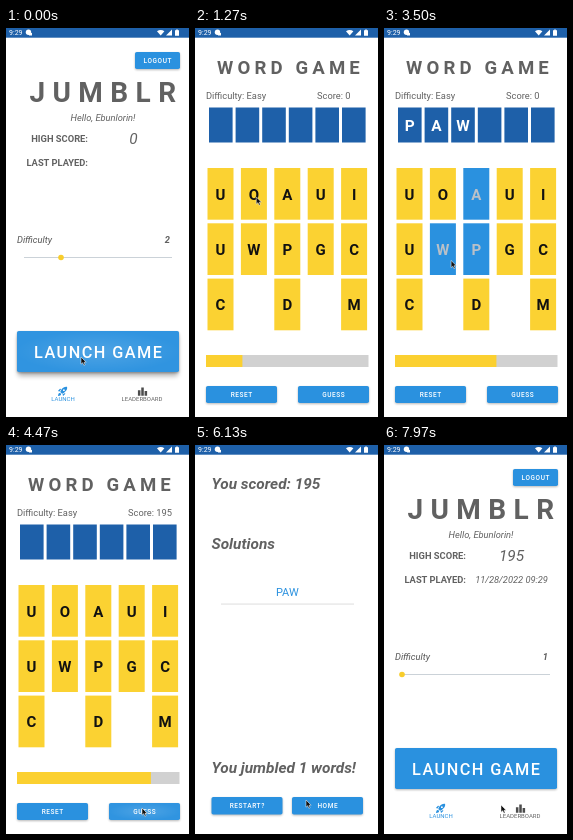
These frames come from a looping animation (183x389 px, 8 s). An HTML page:

```html
<!DOCTYPE html>
<html lang="en">
<head>
<meta charset="utf-8">
<title>Word game</title>
<style>
  html, body { margin: 0; width: 100%; height: 100%; overflow: hidden; background: #fff; }
  svg { display: block; width: 100vw; height: 100vh; }
  text { font-family: Roboto, sans-serif; fill: #616161; white-space: pre; }
</style>
</head>
<body>
<svg id="stage" viewBox="0 0 183 389"></svg>
<script>
const LOOP = 8000;
const BLUE = '#2a91df', NAVY = '#1e60a9', YELLOW = '#fbd232', GREY = '#616161';
const LETTERS = ['UOAUI', 'UWPGC', 'C D M'];

// ---------- drawing helpers ----------
const rect = (x, y, w, h, fill, more = '') =>
  `<rect x="${x}" y="${y}" width="${w}" height="${h}" fill="${fill}" ${more}/>`;

function text(x, y, size, str, o = {}) {
  const { weight = 400, italic, fill = GREY, anchor = 'start', gap = 0, id = '' } = o;
  const dx = anchor === 'middle' ? gap / 2 : 0;
  return `<text ${id && `id="${id}"`} x="${x + dx}" y="${y}" text-anchor="${anchor}" style="font-size:${size}px;` +
    `font-weight:${weight};font-style:${italic ? 'italic' : 'normal'};letter-spacing:${gap}px;fill:${fill}">${str}</text>`;
}

function button(id, x, y, w, h, label, size = 6.5, baseline = y + h / 2 + 2.3) {
  return rect(x, y + 1, w, h, '#000', `rx="2" opacity=".28" filter="url(#soft)"`) +
    rect(x, y, w, h, BLUE, 'rx="1.8"') +
    rect(x, y, w, h, 'url(#glow)', `id="${id}Glow" rx="1.8" opacity="0"`) +
    text(x + w / 2, baseline, size, label,
      { weight: 500, fill: '#fff', anchor: 'middle', gap: size * .089 });
}

const screen = (id, body) =>
  `<g id="${id}">${rect(0, 0, 183, 389, '#fff')}${body}</g>`;

// ---------- screens ----------
const bold = { weight: 700 };
const boldItalic = { weight: 700, italic: true };

const home = screen('home',
  button('logout', 129, 24, 45, 17, 'LOGOUT') +
  text(23.5, 74, 28, 'JUMBLR', { ...bold, gap: 7.4 }) +
  text(97, 93, 9.3, 'Hello, Ebunlorin!', { italic: true, anchor: 'middle' }) +
  text(82, 114, 9.35, 'HIGH SCORE:', { ...bold, anchor: 'end' }) +
  text(82, 137.5, 9.35, 'LAST PLAYED:', { ...bold, anchor: 'end' }) +
  text(127.5, 116.3, 15.4, '0', { italic: true, anchor: 'middle', id: 'best' }) +
  text(127.5, 137.5, 9.3, '', { italic: true, anchor: 'middle', id: 'played' }) +
  text(11, 215, 9.3, 'Difficulty', { italic: true, fill: '#555' }) +
  text(164, 215, 9.3, '2', { ...boldItalic, anchor: 'end', id: 'level' }) +
  rect(18, 229, 148, 1, '#cbd2d8') +
  `<circle id="thumb" cy="229.5" r="2.8" fill="#f8cd2c"/>` +
  rect(12, 307, 160, 41, '#000', 'id="lift" rx="2" opacity="0" filter="url(#wide)"') +
  button('launch', 11, 303, 162, 41, 'LAUNCH GAME', 16.3, 330) +
  `<g transform="translate(51 358) scale(.46)" fill="${BLUE}">
    <path d="M22 2C17 1 13 4 10 7Q8 10 7 13L11 17Q14 16 17 13C20 10 23 7 22 2ZM15 7a2 2 0 1 1 0 4a2 2 0 0 1 0-4Z" fill-rule="evenodd"/>
    <path d="M9 6.300L6.500 6.200L2 10.700L5.600 12.200ZM17.700 15L17.800 17.500L13.300 22L11.800 18.400ZM6 15a3 3 0 0 1 2 5Q6 21.500 2 22Q2.500 18 4 16Z"/>
  </g>` +
  `<path transform="translate(131 358) scale(.46)" fill="#4c4c4c" d="M2 9h5.500v12H2ZM9.250 3h5.500v18h-5.500ZM16.500 11H22v10h-5.500Z"/>` +
  text(57, 373, 6, 'LAUNCH', { fill: BLUE, anchor: 'middle' }) +
  text(136, 373, 6, 'LEADERBOARD', { anchor: 'middle' }));

let slots = '', tiles = '';
for (let i = 0; i < 6; i++) {
  const x = 14 + 26.6 * i;
  slots += rect(x, 79.5, 23.6, 35, NAVY) +
    text(x + 11.8, 103, 15.4, '', { ...bold, fill: '#fff', anchor: 'middle', id: 'slot' + i });
}
LETTERS.forEach((row, r) => [...row].forEach((ch, c) => {
  if (ch === ' ') return;
  const x = 12.5 + 33.4 * c, y = 140 + 55.3 * r, id = `${r}${c}`;
  tiles += rect(x, y, 26, 51.7, YELLOW, `id="tile${id}"`) +
    text(x + 13, y + 31.5, 15, ch, { ...bold, fill: '#111', anchor: 'middle', id: 'char' + id });
}));

const game = screen('game',
  text(22, 46, 18.6, 'WORD GAME', { ...bold, gap: 4.15 }) +
  text(11, 71, 9.3, 'Difficulty: Easy') +
  text(122, 71, 9.3, 'Score: 0', { id: 'score' }) +
  slots + tiles +
  rect(11, 327, 162.5, 12, '#d1d1d1') +
  rect(11, 327, 0, 12, '#fbd030', 'id="bar"') +
  button('reset', 11, 358, 71, 17, 'RESET') +
  button('guess', 103, 358, 71, 17, 'GUESS'));

const result = screen('result',
  text(16.5, 44, 15.4, 'You scored: 195', boldItalic) +
  text(16.5, 103.5, 15.4, 'Solutions', boldItalic) +
  text(92.3, 151, 11, 'PAW', { fill: BLUE, anchor: 'middle' }) +
  rect(26, 158.6, 133, .9, '#d9d9d9') +
  text(16.5, 328, 15.4, 'You jumbled 1 words!', boldItalic) +
  button('restart', 16.5, 352, 71, 17.5, 'RESTART?') +
  button('again', 97, 352, 71, 17.5, 'HOME'));

const status = rect(0, 0, 183, 9.7, NAVY) +
  text(3, 7.2, 7, '9:29', { fill: '#fff' }) +
  `<g fill="#fff">
    <circle cx="22.500" cy="4.300" r="2.700"/><path d="M23 5h3v2.500h-3Z"/>
    <path d="M151 3.200Q154.700 .800 158.400 3.200L154.700 7.600Z"/>
    <path d="M160 7.600L166 1.600V7.600Z"/>
    <path d="M169 2.200h1.200v-.700h1.600v.700H173V7.700H169Z"/>
  </g>`;

const stage = document.getElementById('stage');
stage.innerHTML = `<defs>
    <filter id="soft" x="-10%" y="-30%" width="120%" height="170%"><feGaussianBlur stdDeviation=".8"/></filter>
    <filter id="wide" x="-10%" y="-30%" width="120%" height="170%"><feGaussianBlur stdDeviation="2.500"/></filter>
    <radialGradient id="glow"><stop offset="0" stop-color="#fff" stop-opacity=".17"/>
      <stop offset="1" stop-color="#fff" stop-opacity=".03"/></radialGradient>
  </defs>
  ${home}${game}${result}${status}
  <path id="mouse" d="M0 0V7.200L1.700 5.700L2.900 8.300L4.100 7.700L3 5.200H5.200Z" fill="#111" stroke="#fff" stroke-width=".5"/>`;

const $ = id => document.getElementById(id);
const screens = { home: $('home'), game: $('game'), result: $('result') };

// ---------- timeline ----------
const MOVES = [
  { at: 200, from: 'home', to: 'game' },
  { at: 5134, from: 'game', to: 'result' },
  { at: 7390, from: 'result', to: 'home' }
];
const PICKS = [
  { at: 1900, cell: '12', ch: 'P' },
  { at: 2560, cell: '02', ch: 'A' },
  { at: 3250, cell: '11', ch: 'W' }
];
const GUESS_AT = 4340;
const PRESSES = { launch: -120, guess: GUESS_AT, again: 7280 };
const PATH = [
  [0, 75, 329], [90, 75, 329], [430, 14, 89], [700, 14, 92], [1700, 92, 219],
  [2000, 92, 219], [2400, 89, 171], [2650, 89, 171], [3150, 60, 219], [3350, 60, 219],
  [4150, 136, 363], [4550, 136, 363], [5130, 90, 292], [5350, 90, 292],
  [6050, 111, 355], [6200, 111, 355], [6570, 117, 360], [8000, 117, 360]
];

const clamp = v => Math.max(0, Math.min(1, v));
const cubic = (a, b, c, d, s) => {
  const r = 1 - s;
  return a * r * r * r + 3 * b * r * r * s + 3 * c * r * s * s + d * s * s * s;
};

// fast start, very slow finish: two joined bezier curves
function glide(p) {
  if (p <= 0) return 0;
  if (p >= 1) return 1;
  const [xs, ys] = p < 1 / 6
    ? [[0, .05, .13333, 1 / 6], [0, 0, .06, .4]]
    : [[1 / 6, .20833, .25, 1], [.4, .82, 1, 1]];
  let lo = 0, hi = 1;
  for (let i = 0; i < 24; i++) {
    const mid = (lo + hi) / 2;
    if (cubic(...xs, mid) < p) lo = mid; else hi = mid;
  }
  return cubic(...ys, lo);
}

function place(name, x, alpha) {
  const el = screens[name];
  el.style.display = 'inline';
  el.setAttribute('transform', `translate(${x.toFixed(2)} 0)`);
  el.setAttribute('opacity', alpha);
}

function drawScreens(t) {
  for (const k in screens) screens[k].style.display = 'none';
  const move = MOVES.filter(m => t >= m.at).pop();
  if (!move) return place('home', 0, 1);
  const age = t - move.at, p = glide(age / 450);
  if (age < 140) place(move.from, -18.3 * p, 1);
  place(move.to, 18.3 * (1 - p), clamp((age - 50) / 83));
  // the arriving screen lies above the leaving one
  const top = screens[move.to], under = screens[move.from];
  if (under.compareDocumentPosition(top) & Node.DOCUMENT_POSITION_PRECEDING) under.after(top);
}

function drawHome(t) {
  const later = t > 6500;
  $('best').textContent = later ? '195' : '0';
  $('played').textContent = later ? '11/28/2022 09:29' : '';
  $('level').textContent = later ? '1' : '2';
  $('thumb').setAttribute('cx', later ? 18 : 55);
}

function drawGame(t) {
  PICKS.forEach(({ at, cell, ch }, i) => {
    const on = t >= at && t < GUESS_AT + 40;
    $('slot' + i).textContent = on ? ch : '';
    $('tile' + cell).setAttribute('fill', on ? BLUE : YELLOW);
    $('char' + cell).style.fill = on ? '#b9c0c8' : '#111';
  });
  $('score').textContent = 'Score: ' + (t >= GUESS_AT + 40 ? 195 : 0);
  const tick = Math.min(4, Math.floor((t - 230) / 1000));
  $('bar').setAttribute('width', tick < 0 ? 0 : 162.5 * (.024 + .2 * tick));
}

function drawPresses(t) {
  for (const id in PRESSES) {
    const age = t - PRESSES[id];
    const v = clamp(age / 100) * clamp((450 - age) / 250);
    $(id + 'Glow').setAttribute('opacity', v);
    if (id === 'launch') $('lift').setAttribute('opacity', .3 * v);
  }
}

function drawMouse(t) {
  const i = PATH.findIndex(k => k[0] > t);
  const [t0, x0, y0] = PATH[i - 1], [t1, x1, y1] = PATH[i];
  const p = (t - t0) / (t1 - t0), e = p * p * (3 - 2 * p);
  $('mouse').setAttribute('transform', `translate(${x0 + (x1 - x0) * e} ${y0 + (y1 - y0) * e})`);
}

function frame() {
  const t = performance.now() % LOOP;
  drawScreens(t);
  drawHome(t);
  drawGame(t);
  drawPresses(t);
  drawMouse(t);
  requestAnimationFrame(frame);
}
frame();
</script>
</body>
</html>
```
